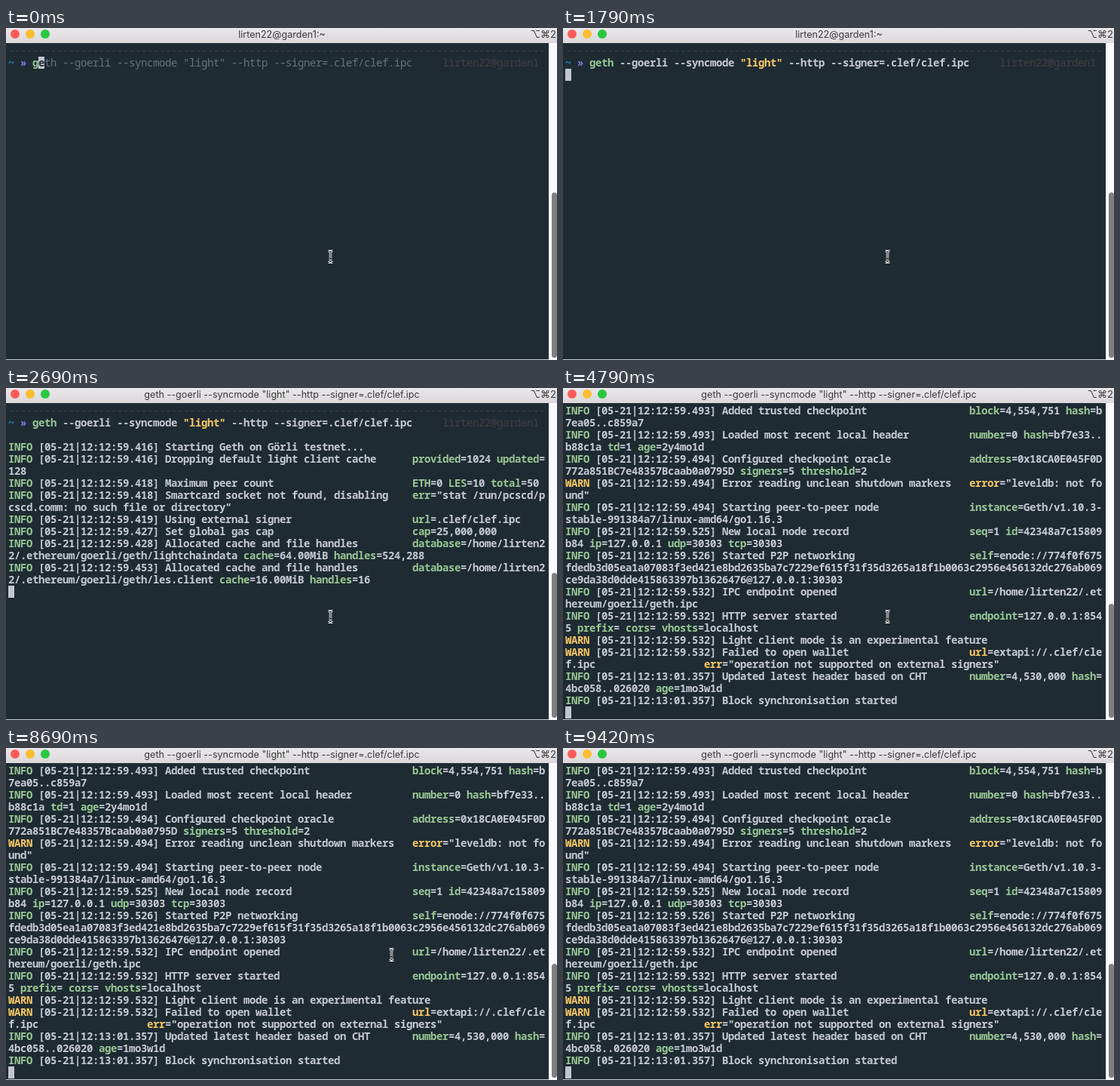
An HTML page for the animation above (9.52 s loop, 731x440 px).

```html
<!DOCTYPE html>
<html lang="en">
<head>
<meta charset="utf-8">
<title>Terminal</title>
<style>
  html, body { margin: 0; width: 100%; height: 100%; overflow: hidden; background: #1e2b33; }
  #stage { position: relative; width: 731px; height: 440px; overflow: hidden; background: #1e2b33; }
  #stage > * { position: absolute; }

  .bar { left: 0; top: 0; width: 731px; height: 20px; background: linear-gradient(#e9e7e9, #dad8da);
    font: 12.6px/17px Inter, "DejaVu Sans", sans-serif; color: #3c3b3c; }
  .bar * { position: absolute; }
  .bar b { top: 2px; width: 12px; height: 12px; border-radius: 50%; }
  .title { left: 0; width: 732px; text-align: center; white-space: pre; }
  .keys { right: 1px; font-size: 13px; }

  .view { left: 3px; top: 22px; width: 715px; height: 416px; overflow: hidden; }
  pre { margin: 0; width: 715px; height: 416px; overflow: hidden; color: #c5c9d4;
    font: 600 14px/16px "Noto Sans Mono", "DejaVu Sans Mono", monospace;
    letter-spacing: var(--gap, -.4px); font-variant-ligatures: none;
    white-space: break-spaces; line-break: anywhere; }
  pre i { display: inline-block; width: 8px; height: 16px; vertical-align: top;
    font-style: normal; background: #c3c5d3; color: #1e2b33; }
  .dim { color: #433f42; font-weight: 400; }
  .hint { color: #65737e; font-weight: 500; }
  .cmd { font-weight: 700; }
  .INFO, .ok { color: #99c794; }
  .WARN, .str { color: #fac863; }
  .bad { color: #ec5f67; }
  .home { color: #1b8ac8; font-weight: 700; }
  .mark { color: #7f7ce2; font-weight: 700; }

  .track { left: 720px; top: 20px; width: 11px; height: 420px; background: #fafafa; }
  .thumb { left: 724px; bottom: 3px; width: 7px; height: 219px; border-radius: 3.5px; background: #7f7f7f; }
  .edge { left: 0; top: 439px; width: 720px; height: 1px; background: #c9cccd; }
  .pointer { left: -5px; top: -10px; width: 10px; height: 20px; }
  .pointer path { fill: none; stroke: #fff; stroke-width: 3; }
  .pointer path + path { stroke: #101418; stroke-width: 1; }

  .film, .thumb, .title, .pointer { animation: 9520ms step-end infinite; }
  .film { animation-name: film; }
  .thumb { animation-name: thumb; }
  .idle { animation-name: idle; }
  .busy { animation-name: busy; }
  .pointer { animation-name: pointer; }

  @keyframes film {
    0% { transform: translateY(0); }
    1.5756% { transform: translateY(-416px); }
    3.1512% { transform: translateY(-832px); }
    4.6218% { transform: translateY(-1248px); }
    6.1974% { transform: translateY(-1664px); }
    18.8025% { transform: translateY(-2080px); }
    28.2563% { transform: translateY(-2496px); }
    29.8319% { transform: translateY(-2912px); }
    50.3151%, 100% { transform: translateY(-3328px); }
  }
  @keyframes thumb {
    0% { height: 219px; }
    28.2563% { height: 192px; }
    29.8319% { height: 158px; }
    50.3151%, 100% { height: 151px; }
  }
  @keyframes idle { 0% { opacity: 1; } 28.2563%, 100% { opacity: 0; } }
  @keyframes busy { 0% { opacity: 0; } 28.2563%, 100% { opacity: 1; } }
  @keyframes pointer {
    0% { transform: translate(430.5px, 303px); }
    91.2815% { transform: translate(511.5px, 274px); }
    92.7521% { transform: translate(613.5px, 302px); }
    94.3277% { transform: translate(681.5px, 419px); }
    95.7983% { transform: translate(687.5px, 436px); }
    97.3739% { transform: translate(707.5px, 440px); opacity: 1; }
    98.9495%, 100% { transform: translate(707.5px, 440px); opacity: 0; }
  }
</style>
</head>
<body>
<div id="stage">
  <div class="bar">
    <b style="left:6px;background:#fc5b57"></b>
    <b style="left:26px;background:#fdbd2e"></b>
    <b style="left:46px;background:#28c840"></b>
    <span class="title idle">lirten22@garden1:~</span>
    <span class="title busy">geth --goerli --syncmode "light" --http --signer=.clef/clef.ipc</span>
    <span class="keys">⌥⌘2</span>
  </div>
  <div class="view"><div class="film"></div></div>
  <div class="track"></div>
  <div class="thumb"></div>
  <div class="edge"></div>
  <svg class="pointer" viewBox="-5 -10 10 20">
    <path d="M-3-7.5H-1.5L0-6L1.5-7.5H3M0-6V6M-1.5 2.5H1.5M-3 7.5H-1.5L0 6L1.5 7.5H3"/>
    <path d="M-3-7.5H-1.5L0-6L1.5-7.5H3M0-6V6M-1.5 2.5H1.5M-3 7.5H-1.5L0 6L1.5 7.5H3"/>
  </svg>
</div>
<script>
const film = document.querySelector('.film');
const span = (cls, text) => `<span class="${cls}">${text}</span>`;
const block = (ch = ' ') => `<i>${ch}</i>`;
const addScreen = html => film.insertAdjacentHTML('beforeend', `<pre>${html}</pre>`);

// Pull every glyph onto the 8px column grid.
function fitGrid() {
  film.innerHTML = '<pre style="letter-spacing:0"><span>' + '0'.repeat(80) + '</span></pre>';
  const probe = film.querySelector('span');
  probe.style.whiteSpace = 'pre';
  const gap = 8 - probe.getBoundingClientRect().width / 80;
  film.style.setProperty('--gap', gap.toFixed(4) + 'px');
  film.innerHTML = '';
}

const command = 'geth --goerli --syncmode "light" --http --signer=.clef/clef.ipc';
const rule = span('dim', '-'.repeat(89)) + '\n';
const prompt = line => rule + span('home', '~') + ' ' + span('mark', '»') + ' ' + line +
  ' '.repeat(5) + span('dim', 'lirten22@garden1') + '\n';

function typing(count, cls) {
  const typed = command.slice(0, count);
  return prompt(span('cmd ' + cls, typed) + block(command[count]) +
    span('hint', command.slice(count + 1)));
}

const entered = prompt(span('cmd', command
  .replace('"light"', span('str', '"light"'))
  .replace('geth', span('ok', 'geth'))));

function log(time, message, fields = '', level = 'INFO') {
  const keyed = fields.replace(/(^| )(\w+)(?==)/g, (_, lead, key) => lead + span(level, key));
  const body = fields ? message.padEnd(41) + keyed : message;
  return `${span(level, level)} [05-21|12:${time}] ${body}\n`;
}

const startup = [
  log('12:59.416', 'Starting Geth on Görli testnet...'),
  log('12:59.416', 'Dropping default light client cache', 'provided=1024 updated=128'),
  log('12:59.418', 'Maximum peer count', 'ETH=0 LES=10 total=50'),
  log('12:59.418', 'Smartcard socket not found, disabling',
    'err="stat /run/pcscd/pcscd.comm: no such file or directory"'),
  log('12:59.419', 'Using external signer', 'url=.clef/clef.ipc'),
  log('12:59.427', 'Set global gas cap', 'cap=25,000,000'),
  log('12:59.428', 'Allocated cache and file handles',
    'database=/home/lirten22/.ethereum/goerli/geth/lightchaindata cache=64.00MiB handles=524,288'),
  log('12:59.453', 'Allocated cache and file handles',
    'database=/home/lirten22/.ethereum/goerli/geth/les.client cache=16.00MiB handles=16')
].join('');

const config = 'mestead: 0 DAO: &lt;nil> DAOSupport: true EIP150: 0 EIP155: 0 EIP158: 0 ' +
  'Byzantium: 0 Constantinople: 0 Petersburg: 0 Istanbul: 1561651, Muir Glacier: &lt;nil>, ' +
  'Berlin: 4460644, YOLO v3: &lt;nil>, Engine: clique}"\n';

const running = [
  log('12:59.493', 'Added trusted checkpoint', 'block=4,554,751 hash=b7ea05..c859a7'),
  log('12:59.493', 'Loaded most recent local header', 'number=0 hash=bf7e33..b88c1a td=1 age=2y4mo1d'),
  log('12:59.494', 'Configured checkpoint oracle',
    'address=0x18CA0E045F0D772a851BC7e48357Bcaab0a0795D signers=5 threshold=2'),
  log('12:59.494', 'Error reading unclean shutdown markers', 'error="leveldb: not found"', 'WARN'),
  log('12:59.494', 'Starting peer-to-peer node',
    'instance=Geth/v1.10.3-stable-991384a7/linux-amd64/go1.16.3'),
  log('12:59.525', 'New local node record',
    'seq=1 id=42348a7c15809b84 ip=127.0.0.1 udp=30303 tcp=30303'),
  log('12:59.526', 'Started P2P networking', 'self=enode://774f0f675' +
    'fdedb3d05ea1a07083f3ed421e8bd2635ba7c7229ef615f31f35d3265a18f1b0063c2956e456132dc276ab069' +
    'ce9da38d0dde415863397b13626476@127.0.0.1:30303'),
  log('12:59.532', 'IPC endpoint opened', 'url=/home/lirten22/.ethereum/goerli/geth.ipc'),
  log('12:59.532', 'HTTP server started', 'endpoint=127.0.0.1:8545 prefix= cors= vhosts=localhost'),
  log('12:59.532', 'Light client mode is an experimental feature', '', 'WARN'),
  log('12:59.532', 'Failed to open wallet', 'url=extapi://.clef/clef.ipc' + ' '.repeat(18) +
    'err="operation not supported on external signers"', 'WARN')
].join('');

const synced =
  log('13:01.357', 'Updated latest header based on CHT', 'number=4,530,000 hash=4bc058..026020 age=1mo3w1d') +
  log('13:01.357', 'Block synchronisation started');

fitGrid();
[
  typing(1, 'ok'),
  typing(2, 'bad'),
  typing(3, 'bad'),
  typing(4, 'ok'),
  typing(5, 'ok'),
  entered + block(),
  entered + '\n' + startup + block(),
  config + running + block(),
  running + synced + block()
].forEach(addScreen);
</script>
</body>
</html>
```
